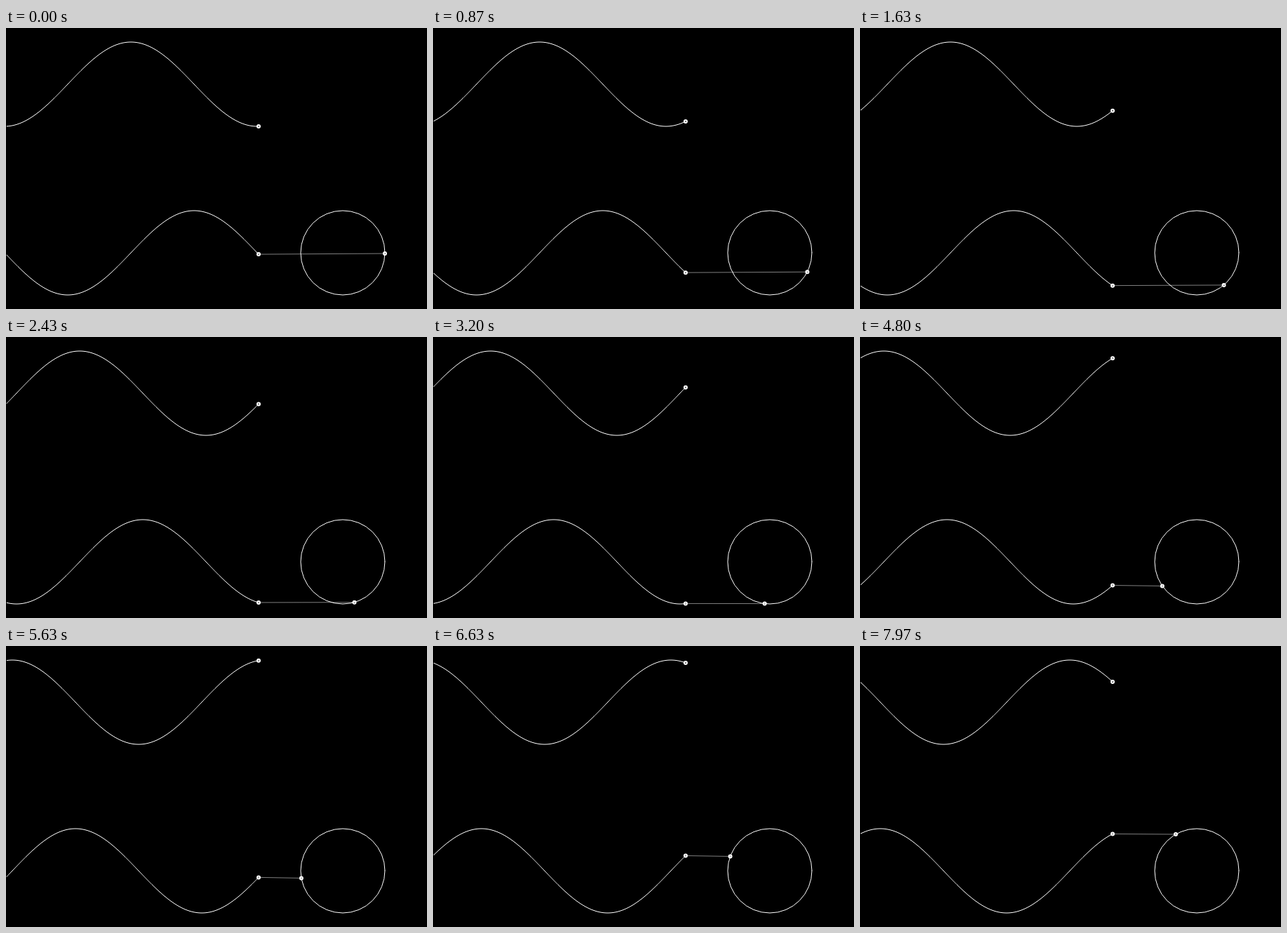
Animation, 600 px wide and 400 px high, one loop 8000 ms. Source, as an HTML page with a canvas:

```html
<!DOCTYPE html>
<html lang="en">
<head>
<meta charset="utf-8">
<title>Circle and waves</title>
<style>
  html, body { margin: 0; width: 100%; height: 100%; overflow: hidden; background: #000; }
  canvas { display: block; }
</style>
</head>
<body>
<canvas id="stage" width="600" height="400"></canvas>
<script>
const ctx = document.getElementById("stage").getContext("2d");
const LOOP = 8000, STEP = 100 / 3; // ms; one degree per step
const RADIUS = 60, WAVE_END = 360, CIRCLE_X = 480, CIRCLE_Y = 320, TOP_Y = 80;
const sin = deg => Math.sin(deg * Math.PI / 180);
const cos = deg => Math.cos(deg * Math.PI / 180);

function path(width, build) {
  ctx.lineWidth = width;
  ctx.beginPath();
  build();
  ctx.stroke();
}

function ring(x, y, radius, width) {
  path(width, () => ctx.arc(x, y, radius, 0, 2 * Math.PI));
}

function wave(centerY, fn, phase) {
  const yAt = x => centerY + RADIUS * fn(x + phase);
  path(1, () => {
    for (let x = 1; x <= WAVE_END; x++) ctx.lineTo(x, yAt(x));
  });
  ring(WAVE_END, yAt(WAVE_END), 2, 2);
}

function draw(time) {
  // steps fall on a 10 ms clock
  const tick = Math.floor((time % LOOP) / 10) * 10;
  const step = Math.floor((tick + 4) / STEP);
  const angle = step + 1, phase = step + 2;
  const x = CIRCLE_X + RADIUS * cos(angle);
  const y = CIRCLE_Y + RADIUS * sin(angle);

  ctx.fillStyle = "#000";
  ctx.fillRect(0, 0, 600, 400);
  ctx.strokeStyle = "#fff";
  ctx.lineCap = ctx.lineJoin = "round";

  wave(TOP_Y, cos, phase);
  wave(CIRCLE_Y, sin, phase);
  ring(CIRCLE_X, CIRCLE_Y, RADIUS, 1);
  path(0.5, () => {
    ctx.moveTo(WAVE_END, CIRCLE_Y + RADIUS * sin(phase));
    ctx.lineTo(x, y);
  });
  ring(x, y, 2, 2);
}

const start = performance.now();
function frame() {
  draw(performance.now() - start);
  requestAnimationFrame(frame);
}
frame();
</script>
</body>
</html>
```
